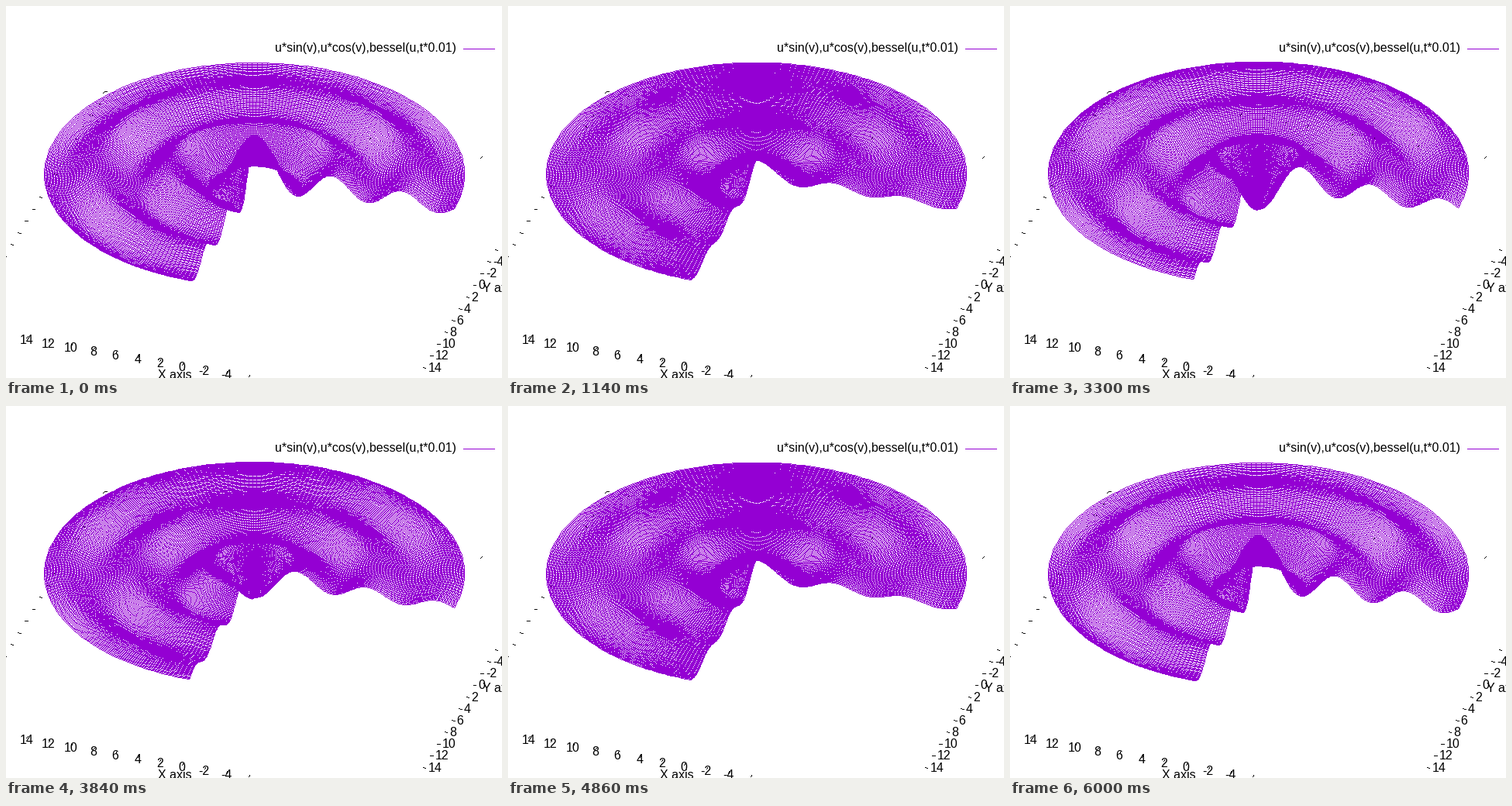
Recreate the animation shown at these times as a matplotlib script. Size 640 by 480 pixels, loop 6.06 s.

```python
import numpy as np
import matplotlib.pyplot as plt
from matplotlib.animation import FuncAnimation

W, H, DPI = 640, 480, 100
FRAMES, STEP = 101, 60
PURPLE, BLACK = (148, 0, 211), (0, 0, 0)
FONT = dict(family="Liberation Sans", size=16 * 72 / DPI, color="black")

# Orthographic view: turned by 18 degrees, tilted by 58 degrees
CX, CY, BASE = 320, 216, 311
SCALE, TURN, TILT, LIFT = 15.06, np.radians(18), np.radians(58), 48
EDGE, TICK = 20, 0.25
R_MAX, RINGS, SPOKES = 18, 200, 200


def project(x, y, z=0.0, cy=CY):
    c, s = np.cos(TURN), np.sin(TURN)
    px = CX - SCALE * (c * x + s * y)
    py = cy + SCALE * np.cos(TILT) * (c * y - s * x) - LIFT * z
    return np.stack(np.broadcast_arrays(px, py), axis=-1)


def j0(x):
    """Bessel function of order zero from its integral form."""
    a = (np.arange(200) + 0.5) * np.pi / 200
    return np.cos(np.multiply.outer(x, np.sin(a))).mean(axis=-1)


def draw_lines(img, p, q, color):
    """Draw one-pixel lines from points p to points q."""
    p = np.rint(np.reshape(p, (-1, 2))).astype(np.float32)
    d = np.rint(np.reshape(q, (-1, 2))).astype(np.float32) - p
    n = np.abs(d).max(axis=1)
    step = d / np.maximum(n, 1)[:, None]
    k = 0
    while len(p):
        x, y = np.floor(p + k * step + 0.5).astype(int).T
        ok = (x >= 0) & (x < W) & (y >= 0) & (y < H)
        img[y[ok], x[ok]] = color
        k += 1
        more = n >= k
        p, step, n = p[more], step[more], n[more]


fig = plt.figure(figsize=(W / DPI, H / DPI), dpi=DPI, facecolor="white")
ax = fig.add_axes([0, 0, 1, 1])
canvas = np.full((H, W, 3), 255, np.uint8)
picture = ax.imshow(canvas, extent=(0, W, H, 0), interpolation="nearest", aspect="auto")
ax.axis("off")


def label(x, y, text, ha="center"):
    ax.text(x, y, text, ha=ha, va="baseline", **FONT)


def draw_axes():
    n = np.arange(-EDGE, EDGE + 1, 2)
    for side in (-EDGE, EDGE):
        inner = side - np.sign(side) * TICK
        draw_lines(canvas, project(n, side, cy=BASE), project(n, inner, cy=BASE), BLACK)
        draw_lines(canvas, project(side, n, cy=BASE), project(inner, n, cy=BASE), BLACK)
    for t in range(-4, 15, 2):
        x, y = project(t, EDGE, cy=BASE)
        label(x, y + 8, str(t))
        x, y = project(-EDGE, t, cy=BASE)
        label(x + 3, y + 5, str(t), "left")
    label(217.5, 481, "X axis")
    label(615, 369, "Y axis", "left")
    label(581.5, 59, "u*sin(v),u*cos(v),bessel(u,t*0.01)", "right")
    draw_lines(canvas, (590, 55), (630, 55), PURPLE)


draw_axes()

u = np.linspace(0, R_MAX, RINGS)
v = np.linspace(0, 1.5 * np.pi, SPOKES)
U, V = np.meshgrid(u, v)
MX, MY = U * np.sin(V), U * np.cos(V)
WAVE = j0(u)


def update(i):
    grid = project(MX, MY, WAVE * np.cos(2 * np.pi * i * 0.01))
    img = canvas.copy()
    draw_lines(img, grid[:-1], grid[1:], PURPLE)
    draw_lines(img, grid[:, :-1], grid[:, 1:], PURPLE)
    picture.set_data(img)
    return (picture,)


anim = FuncAnimation(fig, update, frames=FRAMES, interval=STEP, repeat=True,
                     repeat_delay=0, blit=False)
plt.show()
```
